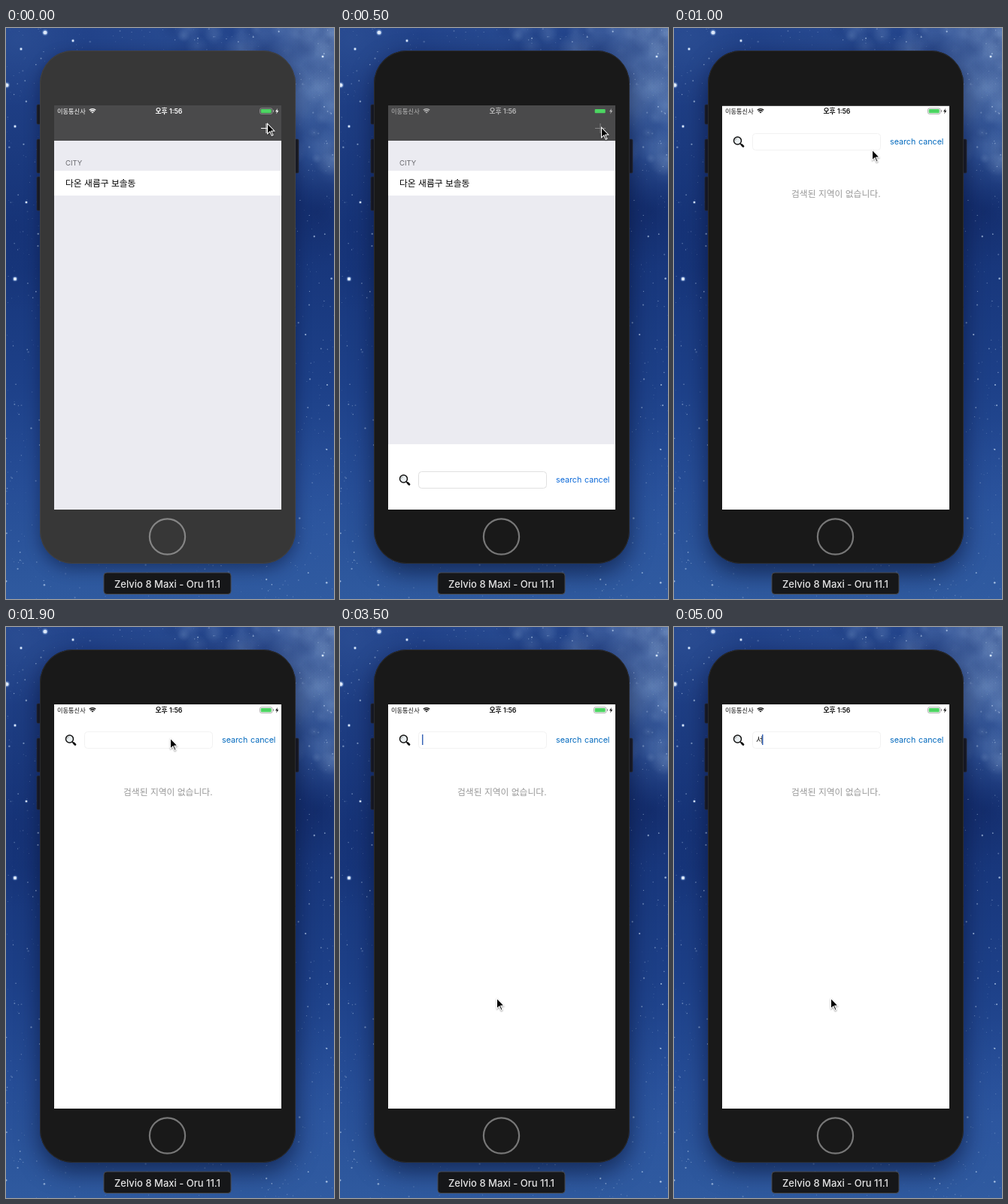
An HTML page with a canvas that plays this animation: 436x760 px, repeating every 5.1 s.

```html
<!DOCTYPE html>
<html lang="ko">
<head>
<meta charset="utf-8">
<title>City search</title>
<style>
html, body { margin: 0; width: 436px; height: 760px; overflow: hidden; background: #1f4690; }
canvas { display: block; }
</style>
</head>
<body>
<canvas id="stage" width="436" height="760"></canvas>
<script>
const LOOP = 5100, STEP = 100;
const SCREEN = { x: 64, y: 103, w: 302, h: 538 };
const FONT = 'Inter, "Noto Sans CJK KR", "Noto Sans CJK JP", "Noto Sans CJK", sans-serif';
const stage = document.getElementById('stage');
const sky = document.createElement('canvas');
sky.width = 436;
sky.height = 760;
let g = sky.getContext('2d');

const clamp = v => Math.max(0, Math.min(1, v));
const smooth = v => v * v * (3 - 2 * v);

function rect(x, y, w, h, fill) {
  g.fillStyle = fill;
  g.fillRect(x, y, w, h);
}
function box(x, y, w, h, r, fill, stroke, width = 1) {
  g.beginPath();
  g.roundRect(x, y, w, h, r);
  if (fill) { g.fillStyle = fill; g.fill(); }
  if (stroke) { g.strokeStyle = stroke; g.lineWidth = width; g.stroke(); }
}
function disc(x, y, r, fill) {
  g.fillStyle = fill;
  g.beginPath();
  g.arc(x, y, r, 0, 7);
  g.fill();
}
function ring(x, y, r, stroke, width, from = 0, to = 7) {
  g.strokeStyle = stroke;
  g.lineWidth = width;
  g.beginPath();
  g.arc(x, y, r, from, to);
  g.stroke();
}
function line(x1, y1, x2, y2, stroke, width) {
  g.strokeStyle = stroke;
  g.lineWidth = width;
  g.beginPath();
  g.moveTo(x1, y1);
  g.lineTo(x2, y2);
  g.stroke();
}
function poly(points, fill) {
  g.beginPath();
  points.forEach(([x, y]) => g.lineTo(x, y));
  g.closePath();
  g.fillStyle = fill;
  g.fill();
}
function text(str, x, y, size, fill, weight = 400, align = 'left') {
  g.font = `${weight} ${size}px ${FONT}`;
  g.textAlign = align;
  g.fillStyle = fill;
  g.fillText(str, x, y);
}
function cloud(x, y, r, rgb, alpha) {
  const soft = g.createRadialGradient(x, y, 0, x, y, r);
  soft.addColorStop(0, `rgba(${rgb},${alpha})`);
  soft.addColorStop(1, `rgba(${rgb},0)`);
  rect(x - r, y - r, 2 * r, 2 * r, soft);
}

function paintSky() {
  const base = g.createLinearGradient(0, 0, 0, 760);
  [[0, '#22438a'], [.2, '#1c3b80'], [.42, '#18377c'], [.62, '#1d4088'], [.8, '#264d96'], [1, '#2f5a9f']]
    .forEach(stop => base.addColorStop(...stop));
  rect(0, 0, 436, 760, base);

  // x, y, radius, rgb, opacity
  [[425, 25, 120, '140,170,212', .5], [390, 85, 75, '110,146,198', .35], [428, 150, 90, '80,120,184', .45],
   [412, 245, 75, '16,38,98', .6], [15, 15, 90, '60,98,164', .3], [12, 265, 110, '16,42,108', .35],
   [430, 660, 140, '58,104,182', .2], [220, 0, 110, '52,90,158', .3]
  ].forEach(c => cloud(...c));

  let seed = 41;
  const rnd = () => (seed = seed * 16807 % 2147483647) / 2147483647;
  // wisps, densest towards the top right
  for (let i = 0; i < 160; i++)
    cloud(436 - rnd() ** 2 * 220, rnd() ** 1.5 * 190, 6 + rnd() * 22, i % 2 ? '165,195,232' : '18,44,108', .04 + rnd() * .14);
  for (let i = 0; i < 1500; i++)
    disc(rnd() * 436, rnd() * 760, .35 + rnd() ** 4 * .95, `rgba(190,212,240,${.15 + rnd() * .65})`);
  [[52, 6, 2.6], [1, 76, 2.6], [12, 334, 2.2], [12, 131, 1.4], [20, 28, 1.4], [27, 232, 1.3], [89, 17, 1.4], [421, 38, 1.3]]
    .forEach(([x, y, r]) => {
      disc(x, y, r * 1.6, 'rgba(150,190,245,.3)');
      disc(x, y, r, '#dce8fa');
    });
}

function paintDevice(active) {
  const body = active ? '#191919' : '#373737';
  [[41, 102, 26], [41, 148, 45], [41, 198, 45], [383, 148, 45]]
    .forEach(([x, y, h]) => box(x, y, 6, h, 1.5, '#1c1e24', '#34363c', .7));
  g.save();
  g.shadowColor = `rgba(0,8,35,${active ? .55 : .4})`;
  g.shadowBlur = active ? 30 : 20;
  g.shadowOffsetY = active ? 12 : 7;
  box(45, 30, 340, 683, 44, body);
  g.restore();
  box(45.5, 30.5, 339, 682, 43.5, null, active ? '#2a2b2e' : '#414143');
  ring(214.5, 677, 23.6, active ? '#777' : '#858585', 2.2);
  box(130, 725, 169, 28.5, 4, '#161719', '#47494e');
  text('Zelvio 8 Maxi - Oru 11.1', 214.5, 745, 13, '#e4e4e4', 500, 'center');
}

function paintList(t) {
  rect(64, 103, 302, 47, '#4a4a4b');
  rect(64, 150, 302, 491, '#ebebf1');
  rect(64, 190, 302, 33, '#fff');
  text('CITY', 79, 183, 9.5, '#6b6b70');
  text('다온 새름구 보솔동', 79, 211, 11.8, '#000');
  const plus = t >= 300 && t < 600 ? '#858586' : '#fff';
  line(339, 133.5, 353, 133.5, plus, 1);
  line(346, 127, 346, 140, plus, 1);
}

// Critically damped spring for the rising sheet
function sheetTop(t) {
  const k = Math.max(0, t - 456.4) * .01644;
  return Math.round(SCREEN.y + SCREEN.h * (1 + k) * Math.exp(-k));
}

function paintSheet(t) {
  const settled = t >= 900;
  const typed = t >= 4900 ? '서' : t >= 4600 ? 'ㅅ' : '';
  const link = settled ? '#0068bd' : '#0a68d8';
  g.save();
  g.translate(0, sheetTop(t));
  rect(64, 0, 302, 538, '#fff');

  disc(84.5, 46, 5, '#e9eef0');
  ring(84.5, 46, 5, '#111', 1.5);
  ring(84.5, 46, 3, '#999', .7, 3.2, 4.6);
  g.lineCap = 'round';
  line(88.3, 50, 89.3, 51, '#111', 1.6);
  line(90, 51.5, 92, 53.4, '#111', 2.8);
  g.lineCap = 'butt';

  box(104.5, 36.5, 170, 22, 4, '#fff', settled ? '#f2f2f2' : '#e0e0e0');
  text('search', 287, 51, 10.7, link);
  text('cancel', 325, 51, 10.7, link);
  text('검색된 지역이 없습니다.', 156, 121, 11.8, '#999');
  text(typed, 109, 51, 10.5, '#111');

  if (t >= 2100) {
    const phase = (t + 500) % 1000;
    const blink = phase < 600 ? clamp((600 - phase) / 200) : clamp((phase - 800) / 200);
    g.globalAlpha = typed ? 1 : blink;
    rect(typed ? 117 : 109, 40, 1.5, 14, '#3c68b8');
  }
  g.restore();
}

function paintStatus(t) {
  const ink = t < 500 ? '#fff' : t < 600 ? '#b8b8b8' : t < 700 ? '#555' : '#111';
  text('이동통신사', 68, 113.7, 8.2, ink);
  text('오후 1:56', 216.5, 113.7, 8.8, ink, 600, 'center');
  [1.6, 4, 6.3].forEach(r => ring(115, 114, r, ink, 1.5, -2.3, -.84));
  const frame = t < 500 ? '#9c9c9c' : t < 900 ? '#4d4d4e' : '#999';
  box(337.5, 106.8, 16.5, 7.6, 2, null, frame, .8);
  box(338.7, 108, 14, 5.2, 1, '#4cd562');
  rect(355, 109, 1, 3, frame);
  poly([[361, 107], [358, 111.2], [360, 111.2], [359.2, 114.5], [362.3, 110], [360.4, 110]], ink);
}

const PATH = [[0, 347, 126], [200, 347, 131], [700, 347, 131], [1000, 263, 161],
  [1200, 247, 158], [1700, 218, 147], [2400, 218, 147], [3200, 208, 493], [LOOP, 208, 493]];

function paintPointer(t) {
  const i = PATH.findIndex(p => p[0] > t);
  const [t0, x0, y0] = PATH[i - 1], [t1, x1, y1] = PATH[i];
  const k = smooth((t - t0) / (t1 - t0));
  g.save();
  g.translate(x0 + (x1 - x0) * k, y0 + (y1 - y0) * k);
  g.shadowColor = 'rgba(0,0,0,.4)';
  g.shadowBlur = 2;
  g.shadowOffsetY = 1;
  poly([[0, 0], [0, 16], [3.6, 12.8], [6, 18], [8.7, 16.8], [6.4, 11.7], [11, 11.4]], '#fff');
  g.shadowColor = 'transparent';
  poly([[1, 2.4], [1, 13.7], [4, 11], [6.5, 16.6], [7.4, 16.2], [4.9, 10.7], [8.8, 10.4]], '#000');
  g.restore();
}

function draw(now) {
  const t = Math.floor(now % LOOP / STEP) * STEP;
  g.drawImage(sky, 0, 0);
  paintDevice(t >= 100);
  g.save();
  g.beginPath();
  g.rect(SCREEN.x, SCREEN.y, SCREEN.w, SCREEN.h);
  g.clip();
  paintList(t);
  paintSheet(t);
  paintStatus(t);
  g.restore();
  paintPointer(t);
}

paintSky();
g = stage.getContext('2d');
let start;
function tick(now) {
  start ??= now;
  draw(Math.max(0, now - start));
  requestAnimationFrame(tick);
}
requestAnimationFrame(tick);
</script>
</body>
</html>
```
